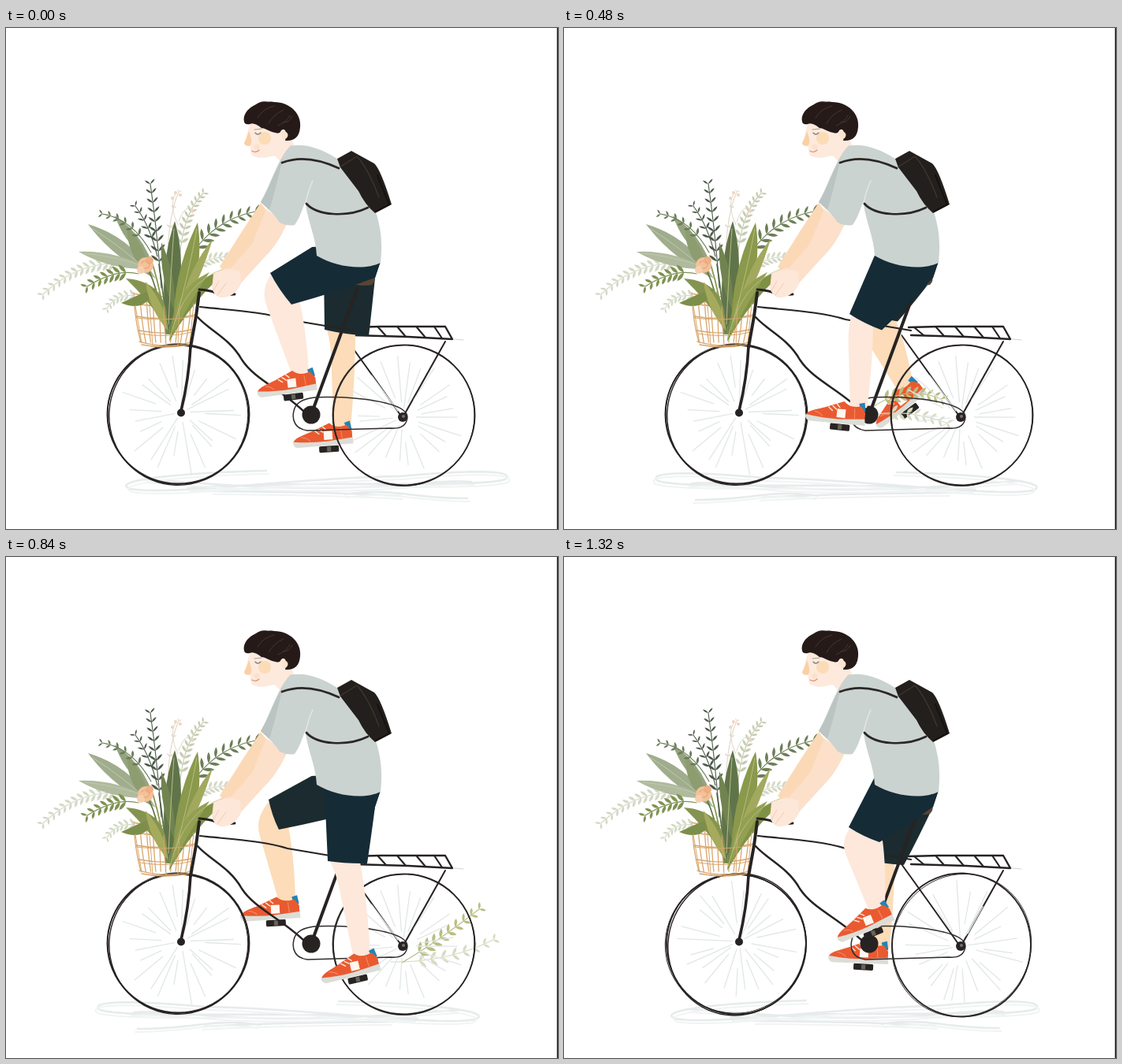
An HTML page for the animation above (1440 ms loop, 700 px wide and 636 px high).

```html
<!DOCTYPE html>
<html lang="en">
<head>
<meta charset="utf-8">
<title>Flower ride</title>
<style>
html, body { margin: 0; width: 100%; height: 100%; overflow: hidden; background: #fff; }
svg { display: block; width: 100vw; height: 100vh; }
</style>
</head>
<body>
<svg id="stage" viewBox="0 0 700 636" fill="none" stroke-linecap="round" stroke-linejoin="round"></svg>
<script>
const STEP = 120, COUNT = 12;
const INK = '#272322';

const fmt = v => Math.round(v * 10) / 10;
const mix = (a, b, t) => a.map((v, i) => v + (b[i] - v) * t);
const fill = (d, color, extra = '') => `<path d="${d}" fill="${color}" ${extra}/>`;
const line = (d, color = INK, w = 2, extra = '') =>
  `<path d="${d}" stroke="${color}" stroke-width="${w}" ${extra}/>`;
const dot = (x, y, r, color, extra = '') =>
  `<circle cx="${x}" cy="${y}" r="${r}" fill="${color}" ${extra}/>`;

function random(seed) {
  return () => (seed = (seed * 16807) % 2147483647) / 2147483647;
}

// ---------- plants ----------

function leaf(x, y, tx, ty, w, color, bend = 0) {
  const dx = tx - x, dy = ty - y, len = Math.hypot(dx, dy) || 1;
  const nx = -dy / len, ny = dx / len;
  const mx = x + dx * .52, my = y + dy * .52;
  const p = k => `${fmt(mx + nx * k)} ${fmt(my + ny * k)}`;
  return fill(`M${fmt(x)} ${fmt(y)}Q${p(bend + w)} ${fmt(tx)} ${fmt(ty)}Q${p(bend - w)} ${fmt(x)} ${fmt(y)}Z`, color);
}

function sprig([x0, y0, cx, cy, x1, y1], n, size, color, fat = .34) {
  let out = line(`M${x0} ${y0}Q${cx} ${cy} ${x1} ${y1}`, color, 1.1);
  for (let i = 1; i <= n; i++) {
    const t = .15 + .85 * i / n, u = 1 - t;
    const x = u * u * x0 + 2 * u * t * cx + t * t * x1;
    const y = u * u * y0 + 2 * u * t * cy + t * t * y1;
    const a = Math.atan2(u * (cy - y0) + t * (y1 - cy), u * (cx - x0) + t * (x1 - cx));
    const s = size * (1.1 - .45 * t);
    for (const side of [-.85, .85]) {
      out += leaf(x, y, x + s * Math.cos(a + side), y + s * Math.sin(a + side), s * fat, color);
    }
  }
  return out;
}

function bouquet() {
  const pale = '#d3d8c4', sage = '#a0ad8d', olive = '#8a994b', deep = '#60744a', dark = '#4b5a48';
  let s = '';
  s += sprig([165, 302, 100, 288, 47, 338], 13, 12, pale);
  s += sprig([232, 310, 258, 285, 298, 292], 9, 11, pale);
  s += sprig([220, 300, 222, 238, 250, 210], 10, 11, '#c6ccb0');
  s += sprig([180, 345, 145, 330, 128, 356], 7, 10, pale);
  s += sprig([205, 300, 205, 240, 219, 208], 3, 6, '#e3d6c5');
  s += line('M218 250Q206 225 215 210M219 246Q228 220 239 232', '#dcd9cc', 1);
  [[215, 209], [221, 212], [211, 216], [236, 233]].forEach(([x, y]) => s += dot(x, y, 2, '#f1d4c0'));

  s += leaf(190, 318, 104, 249, 18, sage, 4);
  s += leaf(182, 306, 92, 284, 13, '#b0ba9d');
  s += leaf(186, 300, 138, 238, 13, '#95a47e');
  s += leaf(184, 316, 154, 252, 14, '#8d9d70', -4);
  s += line('M188 316Q150 280 110 255M180 304Q140 290 100 286', '#c0c8ae', 1);

  for (let i = 0; i < 9; i++) {
    s += line(`M${203 + i} 388Q${196 + i * 2} 340 ${178 + i * 8} 300`, i % 2 ? olive : deep, 1.8);
  }
  s += sprig([197, 330, 192, 260, 183, 198], 9, 13, dark, .26);
  s += sprig([192, 290, 182, 250, 164, 226], 5, 11, dark, .26);
  s += sprig([184, 285, 160, 242, 122, 236], 6, 10, '#697b58');
  s += sprig([168, 312, 140, 305, 103, 328], 7, 14, '#7f9252');
  s += sprig([226, 305, 255, 245, 316, 233], 9, 16, '#6c7e56', .28);

  s += leaf(205, 385, 214, 245, 21, deep, 3);
  s += leaf(214, 360, 197, 272, 11, '#71844f');
  s += leaf(212, 385, 243, 247, 22, olive, 5);
  s += leaf(218, 372, 262, 268, 11, '#a2a95e', -5);
  s += leaf(204, 380, 152, 318, 18, '#849450', 22);
  s += leaf(190, 330, 146, 349, 13, '#7b8e4b', -12);
  s += leaf(207, 398, 283, 306, 17, '#7f9145', -28);
  s += leaf(212, 388, 258, 310, 14, '#93a052', -16);
  s += leaf(206, 385, 177, 322, 11, '#a5aa5c');
  s += line('M206 376Q209 310 213 255M215 372Q232 310 242 255M208 393Q225 322 276 306', '#b6bd83', 1);

  s += dot(177, 301, 10, '#f3c19a') + dot(171, 307, 5, '#f6cfae') + dot(182, 295, 5, '#eeb084');
  s += line('M172 298Q177 293 182 299Q182 306 175 305', '#e9a577', 1.2);
  return s;
}

function basket() {
  let d = '';
  for (let i = 0; i < 11; i++) {
    const x = 162 + i * 8;
    d += `M${x} ${336 + Math.sin(i) * 2}Q${x + 1} 370 ${171 + i * 6.3} 399`;
  }
  d += 'M161 337Q200 346 245 336M162 350Q200 356 243 349M165 366Q200 372 241 364M168 384Q204 391 239 382';
  d += 'M169 398Q204 408 237 398M172 402Q202 408 232 402';
  return line(d, '#d9a66c', 1.3);
}

// ---------- bike ----------

const WHEELS = {
  A: { front: [218.5, 490.5, 90, 88], rear: [504.5, 491.5, 90, 89], seed: 11 },
  B: { front: [223, 488, 89, 87], rear: [503, 492, 89, 86], seed: 47 },
  C: { front: [218.5, 491.5, 88.5, 89], rear: [504, 492.5, 88, 91], seed: 83 }
};
const WHEEL_ORDER = 'ABCBACBACBAC';

function wheel([cx, cy, rx, ry], hx, hy, seed, thick) {
  const r = random(seed * 991);
  let spokes = '';
  for (let i = 0; i < 24; i++) {
    const a = (i + r() * .8) * Math.PI / 12, from = .08 + r() * .3, to = .6 + r() * .32;
    const at = k => `${fmt(hx + (cx - hx) * k + rx * k * Math.cos(a))} ${fmt(hy + (cy - hy) * k + ry * k * Math.sin(a))}`;
    spokes += `M${at(from)}L${at(to)}`;
  }
  const ring = (ox, oy, dr, w, turn) =>
    `<ellipse cx="${cx + ox}" cy="${cy + oy}" rx="${rx + dr}" ry="${ry - dr}" stroke="${INK}" stroke-width="${w}" transform="rotate(${turn} ${cx} ${cy})"/>`;
  return line(spokes, '#e1e7e6', 1.3) + ring(0, 0, 0, 1.9, 0) +
    (thick ? ring(.8, 0, -1.8, 1.4, 24) + ring(-.5, .5, -.8, 1, 70) : ring(.5, .3, -.7, .8, 30));
}

function rack() {
  return line('M437 380L475 379L557 379L566 395L510 392L440 390', INK, 2.4) +
    line('M444 380L456 390M472 380L482 391M496 379L507 392M521 380L532 393M543 379L553 394', INK, 2.2) +
    line('M557 398L505 491M428 390Q462 437 500 491', INK, 2) +
    line('M568 395L580 396', '#cfd3d2', 1);
}

function bikeFrame() {
  return line('M246 354C280 358 325 360 357 370L440 384', INK, 2.1) +
    line('M243 367C258 384 284 394 299 421C316 447 350 459 380 489', INK, 2.5) +
    line('M446 330L388 488', INK, 4) +
    fill('M436 323Q450 315 466 314Q470 320 464 326Q450 329 436 323Z', '#594335') +
    line('M365 486C369 466 398 468 430 469C475 472 509 480 509 494C508 505 500 509 488 508L382 511C367 509 362 498 365 486Z', '#302c2b', 1.5) +
    dot(387, 491, 11.5, INK) + dot(503, 494, 6, INK) + dot(504, 493, 2, '#77706c');
}

function fork() {
  return line('M245 336L241 366L234 405', INK, 4) + line('M234 404Q232 445 222 486', INK, 3.6) +
    dot(222, 488.5, 5, INK) + line('M245 332Q258 333 266 336T290 338', INK, 3);
}

const SHADOWS = ['', 'matrix(-1 0 0 1 752 2)', 'matrix(.96 0 0 1 -10 1)'];

function ground(i) {
  const d = 'M330 562C210 565 132 575 157 585C205 594 370 571 500 569C600 560 647 562 633 573C590 585 410 573 230 584' +
    'M175 573C260 578 340 588 470 582C530 578 560 574 590 576M430 592C490 583 510 597 585 597M260 588Q410 589 500 594';
  return `<g transform="${SHADOWS[i % 3]}">` + line(d, '#e7ebeb', 2.6, 'stroke-dasharray="9 1.5"') +
    line(d, '#f1f4f4', 2, 'transform="translate(3 4)"') + '</g>';
}

// ---------- legs ----------

// step, hem front, hem back, knee, calf, ankle, shoe x / y / tilt
const POSES = [
  [0, 335, 311, 362, 351, 322, 330, 372, 346, 373, 438, 356, 452, -7],
  [1, 333, 308, 346, 346, 315, 330, 358, 342, 356, 434, 335, 448, -3],
  [3, 341, 342, 375, 376, 333, 358, 365, 372, 346, 464, 316, 475, 9],
  [5, 383, 384, 431, 391, 387, 400, 419, 388, 402, 494, 374, 503, 3],
  [6, 404, 383, 460, 391, 412, 400, 443, 388, 426, 508, 402, 518, -4],
  [7, 408, 386, 458, 389, 419, 402, 449, 387, 451, 506, 436, 521, -13],
  [9, 396, 378, 446, 383, 394, 398, 437, 381, 466, 460, 466, 489, -52],
  [11, 361, 343, 400, 362, 350, 360, 404, 360, 396, 444, 380, 464, -22]
];

function keyed(keys, step) {
  const k = keys.findIndex(p => p[0] >= step);
  if (k <= 0) return keys[Math.max(k, 0)].slice(1);
  const a = keys[k - 1], b = keys[k];
  return mix(a, b, (step - a[0]) / (b[0] - a[0])).slice(1);
}

function shoe(x, y, tilt) {
  return `<g transform="translate(${x} ${y}) rotate(${tilt})">` +
    '<rect x="-6" y="13" width="25" height="8" rx="1.5" fill="#282423"/><rect x="4" y="14" width="5" height="6" fill="#66645a"/>' +
    fill('M28 -15L35 -17L37 -6L31 -5Z', '#2383b4') +
    fill('M-38 6C-36 -1 -21 -3 -8 -9L9 -16C16 -9 24 -10 31 -12L37 -4L37 8L-36 9Z', '#ea5a30') +
    fill('M-38 5Q-16 8 4 7L37 4L38 12L-34 13Q-40 10 -38 5Z', '#dcddd7') +
    line('M-10 -7L-5 -3M-5 -9L0 -5M0 -12L4 -8', '#fbe4d8', 1.5) +
    line('M-27 0Q-20 1 -17 5M23 -8L24 4', '#f58d67', 1) +
    '<rect x="1" y="-6" width="11" height="11" fill="#fff6f0"/></g>';
}

function leg(step, skin, cloth) {
  const [ax, ay, bx, by, kx, ky, cx, cy, nx, ny, sx, sy, tilt] = keyed(POSES, step % COUNT);
  const tilted = Math.max(0, -tilt - 15) * .15;
  const [fx, fy] = mix([kx, ky], [nx - 11, ny], .22);
  const hip = 388 + (ay - 310) * .2;
  const shin = `M${ax + 3} ${ay}Q${kx} ${ky} ${fx} ${fy}L${nx - 11} ${ny + tilted}L${nx - 5} ${ny + 8}L${nx + 10} ${ny + 3}L${nx + 11} ${ny - tilted}` +
    `Q${(cx + nx + 11) / 2 + 3} ${(cy + ny) / 2 - 8} ${cx} ${cy}L${(ax + bx) / 2} ${(ay + by) / 2 - 8}Z`;
  const shorts = `M${hip} 278L${ax} ${ay}Q${(ax + bx) / 2 - 2} ${(ay + by) / 2 + 2} ${bx} ${by}` +
    `Q${(bx + 468) / 2} ${(by + 318) / 2 + 2} 468 317L475 296L440 275Z`;
  return fill(shin, skin) + shoe(sx, sy, tilt) + fill(shorts, cloth);
}

// ---------- loose sprigs ----------

const UPPER = [
  [3, 352, 474, 385, 462, 412, 478],
  [5, 418, 498, 475, 440, 545, 464],
  [7, 502, 515, 545, 490, 600, 447],
  [9, 572, 462, 605, 440, 637, 453],
  [10, 612, 455, 640, 440, 664, 454]
];
const LOWER = [
  [3, 362, 486, 390, 478, 420, 492],
  [5, 424, 496, 480, 488, 552, 511],
  [7, 488, 514, 560, 515, 618, 486],
  [9, 552, 478, 595, 476, 635, 492],
  [10, 600, 484, 640, 480, 670, 494]
];

function drift(i) {
  if (i < 3 || i > 10) return '';
  const faint = i > 9 ? .35 : i > 8 ? .75 : 1;
  return `<g opacity="${faint}">` + sprig(keyed(LOWER, i), 8, 13, '#d7dac3') +
    sprig(keyed(UPPER, i), 9, 14, i < 8 ? '#b9bd82' : '#cdd1ad') + '</g>';
}

// ---------- rider ----------

function rider() {
  let s = '';
  s += fill('M323 222L300 257L271 303Q280 314 291 309L343 248Z', '#fbd9b7');
  s += fill('M330 230L356 249Q344 276 326 293L296 326Q290 342 272 342Q259 338 262 322L263 312Q275 306 286 304L312 274Z', '#fce0ca');
  s += fill('M264 311Q280 303 297 309L298 325Q289 343 271 342Q259 336 264 311Z', '#fde7d8');
  s += line('M270 321L263 334M279 324L268 339', '#f6cbb0', 1);
  s += fill('M310 120C306 131 305 140 302 146Q304 151 310 150C310 156 309 163 318 164C330 167 335 161 342 163L348 170L366 150L354 124Z', '#fdeadd');
  s += fill('M308 131Q305 141 302 146Q303 151 310 149Q313 143 308 131Z', '#fad0a4');
  s += dot(328, 140, 8, '#fbd5a9', 'opacity=".75"') + dot(318, 151, 3.5, '#fddcc0', 'opacity=".7"');
  s += line('M316 133Q319 137 323 133', '#7b8988', 1.4) + line('M315 129L324 128', '#b49b87', 1);
  s += line('M312 156Q317 159 321 155', '#dd8d78', 1.2);
  s += fill('M360 150C377 146 398 152 420 166C454 190 482 235 475 298C455 308 419 304 394 289C393 267 384 249 380 225L366 190Z', '#cbd3d0');
  s += fill('M361 149C345 165 336 198 323 221Q341 237 347 247Q357 252 366 250C374 240 378 222 389 194L386 160Z', '#cbd3d0');
  s += fill('M351 165C341 180 334 204 323 221L334 231Q342 205 351 165Z', '#bac4c3');
  s += line('M389 194Q383 207 380 222', '#e3e8e6', 1.4);
  s += fill('M302 119C299 103 321 91 340 94C361 94 375 110 373 126C372 139 365 144 354 143C357 133 354 126 349 130Q347 135 342 133C335 132 329 127 324 127C318 122 313 120 309 122Q303 123 302 119Z', '#251a18');
  s += dot(353, 136, 4.5, '#fde2cf') + line('M307 111Q300 113 304 119M316 99Q324 92 333 95', '#251a18', 1.5);
  s += line('M319 114Q326 102 340 99M333 121Q340 109 352 104M351 120Q360 120 363 112M345 124Q356 119 360 111', '#49362f', 1);
  s += line('M350 171Q381 159 422 178M381 223C394 238 432 241 459 228', '#2a2726', 2.7);
  s += fill('M420 166L438 156L467 172Q475 179 489 224L468 235Q455 224 447 207L424 177Z', '#231f1d');
  s += line('M424 176L445 163M446 164Q460 180 473 215', '#40372f', 1.2);
  s += line('M471 187L486 224L469 233', '#151211', 2);
  return s;
}

// ---------- scene ----------

const stage = document.getElementById('stage');
const flowers = basket() + bouquet() + line('M164 352L172 400M182 352L186 402M200 354L203 404M220 352L218 403M238 350L233 400M165 368Q200 373 240 366M170 388Q204 394 237 386', '#d9a66c', 1);
const statics = { rack: rack(), frame: bikeFrame(), fork: fork(), rider: rider() };
const edge = '<rect x="698.7" width="1.3" height="636" fill="#111"/>';

function scene(i) {
  const w = WHEELS[WHEEL_ORDER[i]];
  return ground(i) + statics.rack +
    leg(i + 6, '#fcdcb9', '#1b2b2f') + drift(i) +
    wheel(w.front, 222, 488, w.seed, true) + wheel(w.rear, 503, 494, w.seed + 7, false) +
    statics.frame + flowers + statics.fork +
    leg(i, '#fde8db', '#152b36') + statics.rider + edge;
}

const scenes = Array.from({ length: COUNT }, (_, i) => scene(i));
const start = performance.now();
let shown = -1;

function draw(now) {
  const i = Math.floor(Math.max(0, now - start) / STEP) % COUNT;
  if (i !== shown) stage.innerHTML = scenes[shown = i];
  requestAnimationFrame(draw);
}
draw(start);
</script>
</body>
</html>
```
